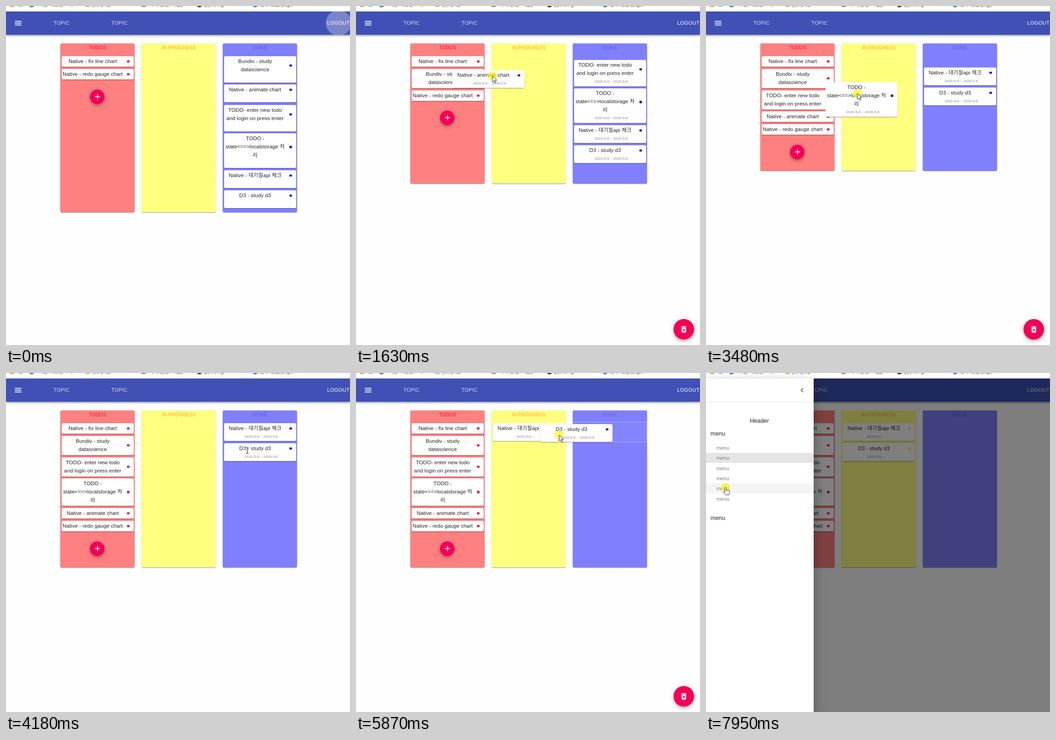
These frames come from a looping animation (754 px wide and 743 px high, 8 s). An HTML page:

```html
<!DOCTYPE html>
<html lang="ko">
<head>
<meta charset="utf-8">
<title>Todo board</title>
<style>
html, body { margin: 0; width: 100%; height: 100%; overflow: hidden; background: #fefefe; }
body { position: relative; font-family: "Liberation Sans", "Noto Sans CJK KR", "Noto Sans CJK JP", sans-serif; color: rgba(0,0,0,.87); }
body div, body span, body p, body svg { position: absolute; margin: 0; }
#stage { left: 0; top: 0; width: 754px; height: 743px; overflow: hidden; }
#marks { width: 754px; height: 12px; overflow: hidden; background: #fff; font-size: 11px; color: #444; white-space: pre; }
#marks span { top: -9px; line-height: 12px; }
#bar { top: 12px; width: 754px; height: 51px; background: #3f51b5; box-shadow: 0 2px 3px rgba(0,0,0,.25), 0 3px 5px rgba(0,0,0,.16); }
#bar-items { width: 754px; height: 51px; overflow: hidden; }
#bar-items span { top: 0; line-height: 51px; font-size: 11.2px; letter-spacing: .32px; color: rgba(255,255,255,.8); }
#bar-items .logout { color: #fff; left: 704px; }
.disc { border-radius: 50%; }
.col { top: 82px; width: 163px; border-radius: 3px; }
.col span { width: 100%; text-align: center; font-size: 10.7px; line-height: 19px; }
.col, .card { box-shadow: 0 2px 1px -1px rgba(0,0,0,.2), 0 1px 1px rgba(0,0,0,.14), 0 1px 3px rgba(0,0,0,.14); }
.card { left: 0; top: 0; width: 157.5px; background: #fff; border-radius: 3px; }
.card p { left: -2px; width: 140px; top: 2px; text-align: center; white-space: pre; font-size: 11.5px; letter-spacing: .08px; line-height: 18.3px; }
.card span { width: 100px; text-align: center; font-size: 8px; line-height: 10px; color: #858585; }
.card div { left: 143px; width: 6px; height: 5.5px; border-radius: 50%; }
.fab { border-radius: 50%; background: #f50057; box-shadow: 0 3px 4px -1px rgba(0,0,0,.2), 0 5px 8px rgba(0,0,0,.14), 0 1px 14px rgba(0,0,0,.12); }
#slot { left: 474px; top: 107px; width: 162px; height: 43px; border: 1px solid rgba(255,255,255,.35); background: rgba(255,255,255,.03); }
#shade { top: 12px; width: 754px; height: 731px; background: rgba(0,0,0,.5); z-index: 10; }
#drawer { top: 12px; width: 236px; height: 731px; background: #fff; z-index: 11; box-shadow: 0 6px 8px -4px rgba(0,0,0,.2), 0 12px 19px 2px rgba(0,0,0,.16), 0 5px 24px 4px rgba(0,0,0,.12); }
#drawer span { line-height: 22px; font-size: 12.8px; }
#drawer .sub { left: 23px; font-size: 11.2px; color: #7c7c7c; }
#drawer .row { width: 236px; height: 22px; }
#drawer .rule { top: 51px; width: 236px; height: 1px; background: #e0e0e0; }
#cursor { left: 0; top: 0; z-index: 12; }
#cursor svg { overflow: visible; left: 0; top: 0; }
</style>
</head>
<body>
<div id="stage"></div>
<script>
const LOOP = 8000;
const ICONS = {
  menu: 'M3 18h18v-2H3zM3 13h18v-2H3zM3 6v2h18V6z',
  add: 'M19 13h-6v6h-2v-6H5v-2h6V5h2v6h6z',
  trash: 'M6 19c0 1.1.9 2 2 2h8c1.1 0 2-.9 2-2V7H6zm2.46-7.12 1.41-1.41L12 12.59l2.12-2.12 1.41 1.41L13.41 14l2.12 2.12-1.41 1.41L12 15.41l-2.12 2.12-1.41-1.41L10.59 14zM15.5 4l-1-1h-5l-1 1H5v2h14V4z',
  back: 'M15.41 7.41 14 6l-6 6 6 6 1.41-1.41L10.83 12z'
};
const RED = '#f20a36', BLUE = '#1616dc', YELLOW = '#f7ea1a';
const SHIFT = 'cubic-bezier(.2,0,0,1)', ENTER = 'cubic-bezier(0,0,.2,1)';

const stage = document.getElementById('stage');

function add(parent, tag, props = {}, style = {}) {
  const el = document.createElement(tag);
  Object.assign(el, props);
  for (const key in style) el.style[key] = typeof style[key] === 'number' && key !== 'zIndex' ? style[key] + 'px' : style[key];
  return parent.appendChild(el);
}

function icon(parent, name, cx, cy, fill = '#fff') {
  parent.insertAdjacentHTML('beforeend',
    `<svg viewBox="0 0 24 24" width="19.2" height="19.2" style="left:${cx - 9.6}px;top:${cy - 9.6}px"><path fill="${fill}" d="${ICONS[name]}"/></svg>`);
}

// Each step [time, props, duration, easing] moves the element on from its current props.
function play(el, start, steps) {
  let now = start;
  const frames = [{ ...now, offset: 0 }];
  for (const [t, to, span = 0, easing = 'linear'] of steps) {
    frames.push({ ...now, offset: t / LOOP, easing });
    now = { ...now, ...to };
    frames.push({ ...now, offset: (t + span) / LOOP });
  }
  frames.push({ ...now, offset: 1 });
  el.animate(frames, { duration: LOOP, iterations: Infinity });
}

const at = (x, y) => ({ transform: `translate(${Math.round(x)}px, ${Math.round(y)}px)` });
const show = (el, spans) => play(el, { opacity: 0 },
  spans.flatMap(([from, to]) => [[from, { opacity: 1 }], [to, { opacity: 0 }]]));

// Bookmark strip
const marks = add(stage, 'div', { id: 'marks' });
[[9, '#e0a030', 0], [50, '#2d87c8', 6], [174, '#e8a83a', 0], [297, '#b06078', 0], [418, '#333', 6], [540, '#2d87c8', 6]]
  .forEach(([left, background, borderRadius]) => add(marks, 'div', {},
    { left, top: -9, width: borderRadius ? 12 : 9, height: borderRadius ? 12 : 11, background, borderRadius }));
[[27, '모'], [72, '지난 자료실'], [143, ','], [190, 'job prep'], [314, '나의 할일'], [370, 'app'], [435, 'python g'], [557, '공부 모음 page']]
  .forEach(([left, textContent]) => add(marks, 'span', { textContent }, { left }));

// App bar
const bar = add(add(stage, 'div', { id: 'bar' }), 'div', { id: 'bar-items' });
const halo = add(bar, 'div', { className: 'disc' }, { left: 7, top: 6.5, width: 38, height: 38, background: 'rgba(0,0,0,.07)' });
icon(bar, 'menu', 26.4, 25.5);
[104, 231].forEach(left => add(bar, 'span', { textContent: 'TOPIC' }, { left }));
const ripple = add(bar, 'div', { className: 'disc' }, { left: 701, top: -3, width: 56, height: 56, background: 'rgba(255,255,255,.3)' });
add(bar, 'span', { textContent: 'LOGOUT', className: 'logout' });
play(ripple, { opacity: 1 }, [[40, { opacity: 0 }, 400, 'ease-in-out']]);
show(halo, [[7060, LOOP]]);

// Columns
const columnX = i => 119.4 + 177.8 * i;
const cardX = i => columnX(i) + 2.7;
const columns = [['TODOS', '#ff8080', '#e8123c'], ['IN PROGRESS', '#ffff80', '#ffa62b'], ['DONE', '#8080ff', '#5a5ae2']]
  .map(([textContent, background, color], i) => {
    const col = add(stage, 'div', { className: 'col' }, { left: columnX(i), background });
    add(col, 'span', { textContent }, { color, letterSpacing: i === 2 ? '.5px' : '0' });
    return col;
  });
show(add(stage, 'div', { id: 'slot' }), [[5790, 6180]]);
const plus = add(stage, 'div', { className: 'fab' }, { left: 184.4, top: 0, width: 32, height: 32 });
icon(plus, 'add', 16, 16);

// Cards
const TOP = 110;
const pitch = (card, dated) => 18.3 * card.rows + 9.8 + (dated ? 16 : 0);
const total = (list, dated) => list.reduce((sum, card) => sum + pitch(card, dated), 0);
const tops = (list, dated) => list.map((_, i) => TOP + total(list.slice(0, i), dated));
const cardHeight = (card, dated) => ({ height: pitch(card, dated) - 4.7 + 'px' });

function makeCard(text, dated) {
  const rows = text.split('\n').length;
  const el = add(stage, 'div', { className: 'card' });
  add(el, 'p', { textContent: text });
  const card = { el, rows, steps: [] };
  card.dot = add(el, 'div', {}, { top: 8.7 + 9.15 * (rows - 1), background: dated ? BLUE : RED });
  if (dated) {
    const top = 6.2 + 18.3 * rows;
    card.range = add(el, 'span', { textContent: '2020-5-6 ~ 2020-5-6' }, { left: 31.5, top });
    card.open = add(el, 'span', { textContent: '2020-5-6 ~' }, { left: 21.5, top, opacity: '0' });
  }
  return card;
}

const todo = ['Native - fix line chart', 'Native - redo gauge chart'].map(text => makeCard(text, false));
const progress = [];
const done = ['Bundiv - study\ndatascience', 'Native - animate chart', 'TODO- enter new todo\nand login on press enter',
  'TODO -\nstate<==>localstorage 처\n리', 'Native - 대기질api 체크', 'D3 - study d3'].map(text => makeCard(text, true));
const cards = [...todo, ...done];
const place = (list, col) => tops(list, col > 0).forEach((y, i) => {
  list[i].start = { ...at(cardX(col), y), ...cardHeight(list[i], col > 0), zIndex: 1 };
});
place(todo, 0);
place(done, 2);

// hold: pointer offset in the card; mid and drop: [time, x, y]; via: pointer stops on the way
const drags = [
  { to: 0, index: 1, hold: [97, 29], grab: 330, leave: 530, mid: [620, 270, 125], enter: 690, drop: [790, 130, 141], settle: 930 },
  { to: 0, index: 2, hold: [88, 13], grab: 1330, leave: 1549, mid: [1630, 212, 140], enter: 1690, drop: [1800, 131, 183], settle: 1930, via: [[900, 566, 123, 350]] },
  { to: 0, index: 2, hold: [71, 21], grab: 2300, leave: 2527, mid: [2640, 205, 155], enter: 2690, drop: [2810, 130, 182], settle: 2950, via: [[1900, 549, 131, 330]] },
  { to: 0, index: 3, hold: [70, 25], grab: 3260, leave: 3420, mid: [3500, 230, 175], enter: 3560, drop: [3700, 130, 229], settle: 3850, via: [[2890, 548, 135, 310]] },
  { to: 1, index: 0, hold: [51, 13], grab: 4470, leave: 4720, mid: [4870, 318, 114], enter: 4900, drop: [5090, 303, 103], settle: 5240, via: [[3760, 529, 170, 360], [4270, 529, 123, 150]] },
  { to: 1, index: 1, hold: [41, 24], grab: 5560, leave: 5780, mid: [5870, 405, 112], enter: 5950, drop: [6150, 303, 112], settle: 6330, via: [[5150, 519, 134, 350]] }
];

const plusY = extra => at(0, TOP + total(todo, false) + extra + 16.8);
const columnHeight = (doneSum, extra) =>
  ({ height: TOP - 82 + Math.max(doneSum + 4, total(todo, false) + extra + 73.8) + 'px' });
const plusStart = plusY(0), columnStart = columnHeight(total(done, true), 0);
const plusSteps = [], columnSteps = [], pointerSteps = [], zoomSteps = [];

for (const { to, index, hold, grab, leave, mid, enter, drop, settle, via = [] } of drags) {
  const doneSum = total(done, true);
  const card = done.shift();
  const target = [todo, progress][to];
  const gap = to ? 0 : pitch(card, true);

  tops(done, true).forEach((y, i) => done[i].steps.push([leave, at(cardX(2), y), 200, SHIFT]));
  if (gap) {
    tops(todo, false).forEach((y, i) => i >= index && todo[i].steps.push([enter, at(cardX(0), y + gap), 200, SHIFT]));
    plusSteps.push([enter, plusY(gap), 200, SHIFT]);
    columnSteps.push([enter, columnHeight(doneSum, gap), 200, SHIFT]);
  }

  target.splice(index, 0, card);
  const rest = tops(target, to > 0);
  const [midT, midX, midY] = mid, [dropT, dropX, dropY] = drop;
  card.steps.push(
    [grab, { zIndex: 5 }],
    [grab, at(midX, midY), midT - grab, 'ease-in'],
    [midT, at(dropX, dropY), dropT - midT, 'ease-out'],
    [dropT, at(cardX(to), rest[index]), settle - dropT, 'ease-out'],
    [settle, { zIndex: 1, ...cardHeight(card, to > 0) }]);
  target.forEach((c, i) => c !== card && c.steps.push([settle, at(cardX(to), rest[i])]));
  plusSteps.push([settle, plusY(0)]);
  columnSteps.push([settle, columnHeight(total(done, true), 0)]);

  play(card.dot, { backgroundColor: BLUE }, [[settle, { backgroundColor: to ? YELLOW : RED }]]);
  show(card.range, [[0, settle]]);
  if (to) show(card.open, [[settle, LOOP]]);

  via.forEach(([t, x, y, span]) => pointerSteps.push([t, at(x, y), span, 'ease-in-out']));
  pointerSteps.push(
    [grab, at(midX + hold[0], midY + hold[1]), midT - grab, 'ease-in'],
    [midT, at(dropX + hold[0], dropY + hold[1]), dropT - midT, 'ease-out']);
  zoomSteps.push([grab, { transform: 'scale(1)' }, 225, 'ease-in-out'], [settle, { transform: 'scale(0)' }, 195, 'ease-in-out']);
}

cards.forEach(card => play(card.el, card.start, card.steps));
play(plus, plusStart, plusSteps);
columns.forEach(col => play(col, columnStart, columnSteps));

const trash = add(stage, 'div', { className: 'fab' }, { left: 696, top: 685.5, width: 44.8, height: 44.8, zIndex: 6 });
icon(trash, 'trash', 22.4, 22.4);
play(trash, { transform: 'scale(0)' }, zoomSteps);

// Drawer
const shade = add(stage, 'div', { id: 'shade' });
const drawer = add(stage, 'div', { id: 'drawer' });
const rowTop = i => 141 + 22.3 * i;
const row = (i, background) => add(drawer, 'div', { className: 'row' }, { top: rowTop(i), background });
show(row(1, '#e5e5e5'), [[7700, LOOP]]);
show(row(4, '#f4f4f4'), [[7880, LOOP]]);
icon(drawer, 'back', 210.5, 25.5, '#555');
add(drawer, 'div', { className: 'rule' });
add(drawer, 'span', { textContent: 'Header' }, { left: 96, top: 81.5 });
[110, 294.5].forEach(top => add(drawer, 'span', { textContent: 'menu' }, { left: 10, top }));
for (let i = 0; i < 6; i++) add(drawer, 'span', { textContent: 'menu', className: 'sub' }, { top: rowTop(i) });
play(shade, { opacity: 0 }, [[7430, { opacity: 1 }, 225, 'ease-in-out']]);
play(drawer, at(-290, 0), [[7430, at(0, 0), 225, ENTER]]);

// Pointer
const cursor = add(stage, 'div', { id: 'cursor' });
const press = add(cursor, 'div', { className: 'disc' }, { left: -10, top: -10, width: 20, height: 20, background: 'rgba(250,245,20,.7)' });
function pointer(d, stroke = '#222') {
  cursor.insertAdjacentHTML('beforeend',
    `<svg width="20" height="20"><path d="${d}" fill="${stroke === 'none' ? '#222' : '#fff'}" stroke="${stroke}" stroke-linejoin="round"/></svg>`);
  return cursor.lastElementChild;
}
const arrow = pointer('M0 0V13L3 10.3 5.2 15.3 7.3 14.4 5.2 9.5H9.3z');
const beam = pointer('M-3-7H-.8L0-6.4.8-7H3V-6H.6V6H3V7H.8L0 6.4-.8 7H-3V6H-.6V-6H-3z', 'none');
const hand = pointer('M-1.5 9V.5Q0-1.5 1.5.5V6Q3 4.8 4 6.3 5.5 5.2 6.5 6.8 8.5 6 8.7 8V12L7 16H-.5L-4.5 10.5Q-4.5 8-1.5 10z');

const beams = drags.map(({ grab }, i) => [[0, grab - 130, grab - 130, grab - 130, 4050, grab - 130][i], grab]);
const HAND = 7680;
show(beam, beams);
show(arrow, beams.map(([, end], i) => [end, i < 5 ? beams[i + 1][0] : HAND]));
show(hand, [[HAND, LOOP]]);
show(press, [...drags.map(({ grab, drop }) => [grab, drop[0]]), [7370, 7440], [7730, 7800], [7900, LOOP]]);
pointerSteps.push(
  [6350, at(27, 46), 730, 'ease-in-out'],
  [7560, at(40, 186), 150, 'ease-in-out'],
  [7800, at(43, 251), 110, 'ease-in-out']);
play(cursor, at(575, 139), pointerSteps);
</script>
</body>
</html>
```
